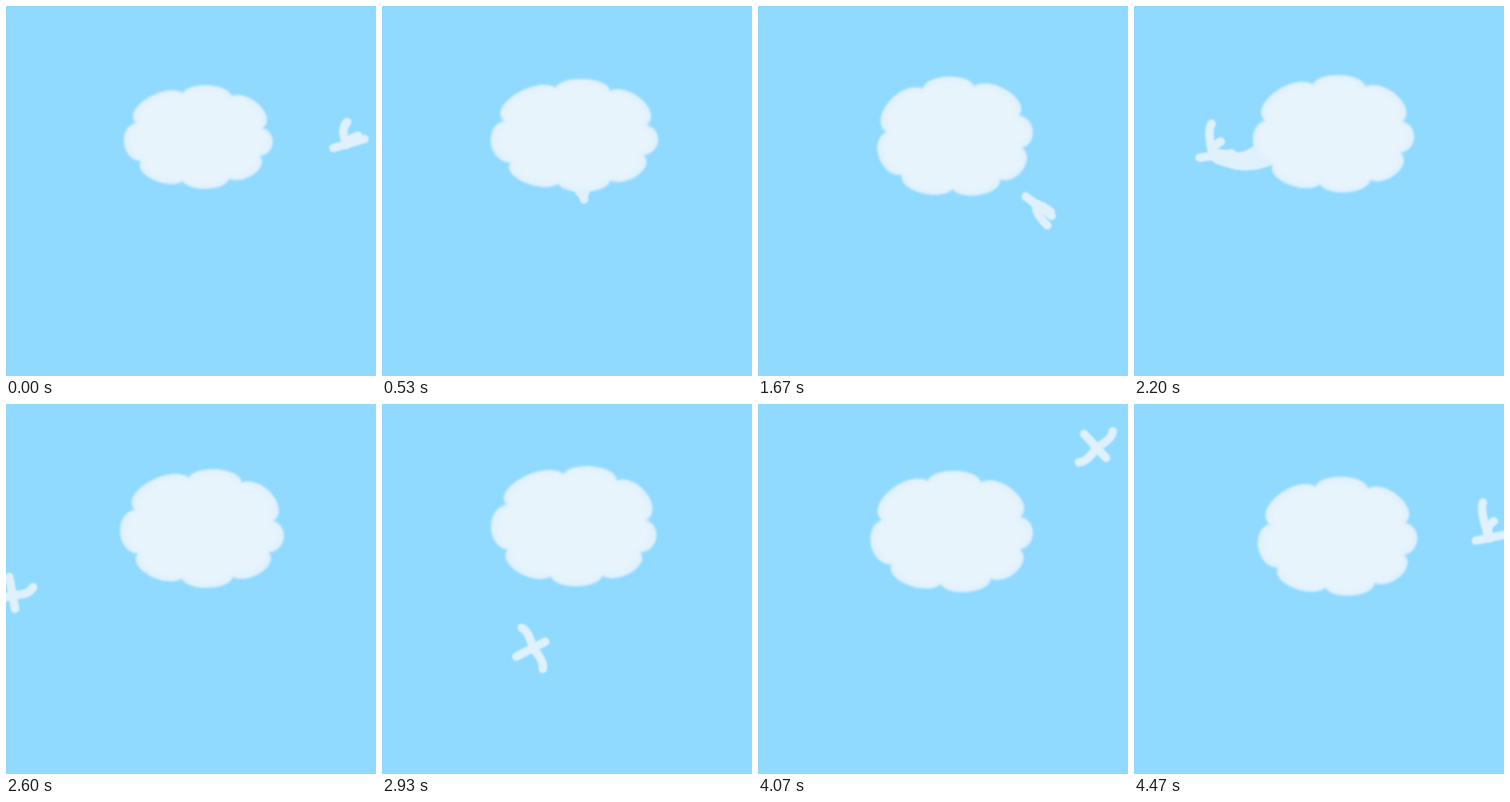
Recreate the animation shown at these times as an HTML page with a canvas. Size 480 px wide and 480 px high, loop 4540 ms.

```html
<!DOCTYPE html>
<html lang="en">
<head>
<meta charset="utf-8">
<title>Cloud and bird</title>
<style>
  html, body { margin: 0; width: 100%; height: 100%; overflow: hidden; background: #90daff; }
  canvas { display: block; width: 100vw; height: 100vh; }
</style>
</head>
<body>
<canvas id="stage" width="480" height="480"></canvas>
<script>
const ctx = document.getElementById('stage').getContext('2d');
const LOOP = 4540, FPS = 15, FRAMES = 68, RAD = Math.PI / 180;
const SKY = '#90daff', EDGE = '#dff1fd', CORE = '#e8f4fc';

// Angles of the notches between the cloud's puffs, clockwise from the right.
const NOTCHES = [21, 60, 101, 146, 195, 253, 296, 346];
const NOTCH_RADIUS = 0.87;

// Key poses of the cloud: frame, centre x, centre y, half width, half height, turn.
const cloudKeys = [
  [0, 250, 170, 95, 66, 3], [8, 250, 168, 107, 72, 2], [18, 250, 172, 100, 78, -14],
  [33, 259, 166, 103, 75, 0], [44, 250, 158, 106, 77, 8], [54, 240, 160, 106, 79, -2],
  [67, 264, 172, 102, 76, -1]
];

// Turning points of the flight: frame, x, y.
const flightKeys = [
  [6, 255, 190], [8, 260, 240], [12, 282, 312], [15, 318, 364], [18, 361, 359], [21, 410, 316],
  [24, 386, 276], [30, 225, 180], [33, 106, 194], [36, 42, 202], [39, 8, 245], [41, 60, 318],
  [44, 193, 318], [48, 262, 210], [51, 275, 125], [54, 341, 87], [57, 366, 52], [60, 418, 36],
  [65, 506, 160], [67, 464, 173], [70, 405, 185], [74, 300, 172]
];

const clamp01 = v => Math.max(0, Math.min(1, v));

// Smooth curve through unevenly spaced keys.
function sample(keys, n) {
  let i = 0;
  while (i < keys.length - 2 && n >= keys[i + 1][0]) i++;
  const a = keys[i], b = keys[i + 1];
  const before = keys[i - 1] || a, after = keys[i + 2] || b;
  const span = b[0] - a[0], u = clamp01((n - a[0]) / span), u2 = u * u, u3 = u2 * u;
  return a.slice(1).map((p, j) => {
    const q = b[j + 1];
    const m0 = (q - before[j + 1]) / (b[0] - before[0]) * span;
    const m1 = (after[j + 1] - p) / (after[0] - a[0]) * span;
    return (2*u3 - 3*u2 + 1) * p + (u3 - 2*u2 + u) * m0 + (3*u2 - 2*u3) * q + (u3 - u2) * m1;
  });
}

function cloudPath([cx, cy, rx, ry, turn]) {
  // Slightly squared ellipse.
  const at = (deg, radius) => {
    const c = Math.cos(deg * RAD), s = Math.sin(deg * RAD);
    const r = radius / (Math.abs(c) ** 2.4 + Math.abs(s) ** 2.4) ** (1 / 2.4);
    return [cx + rx * r * c, cy + ry * r * s];
  };
  const path = new Path2D();
  path.moveTo(...at(NOTCHES[0] + turn, NOTCH_RADIUS));
  NOTCHES.forEach((notch, i) => {
    const from = notch + turn;
    const width = ((NOTCHES[(i + 1) % NOTCHES.length] - notch) + 360) % 360;
    // Control radius that brings the top of the puff to radius 1.
    const reach = (1 - 0.25 * NOTCH_RADIUS * Math.cos(width / 2 * RAD)) /
                  (0.75 * Math.cos(width * 0.35 * RAD));
    path.bezierCurveTo(...at(from + width * 0.15, reach), ...at(from + width * 0.85, reach),
                       ...at(from + width, NOTCH_RADIUS));
  });
  path.closePath();
  return path;
}

function drawCloud(pose) {
  const [cx, cy, rx, ry, turn] = pose;
  ctx.save();
  ctx.filter = 'blur(1.4px)';
  ctx.fillStyle = EDGE;
  ctx.fill(cloudPath(pose));
  ctx.filter = 'blur(4px)';
  ctx.fillStyle = CORE;
  ctx.fill(cloudPath([cx, cy, rx * 0.93, ry * 0.93, turn]));
  ctx.restore();
}

function strokeCurve(width, x0, y0, cx, cy, x1, y1) {
  ctx.lineWidth = width;
  ctx.beginPath();
  ctx.moveTo(x0, y0);
  ctx.quadraticCurveTo(cx, cy, x1, y1);
  ctx.stroke();
}

// Strand of cloud that tapers towards the departing bird.
function drawNeck(x0, y0, x1, y1, sag) {
  ctx.beginPath();
  for (let u = 0; u <= 1; u += 0.05) {
    const x = x0 + (x1 - x0) * u;
    const y = y0 + (y1 - y0) * u + sag * Math.sin(Math.PI * u);
    const radius = 10 + 12 * (1 - u) ** 2;
    ctx.moveTo(x + radius, y);
    ctx.arc(x, y, radius, 0, 2 * Math.PI);
  }
  ctx.fill();
}

function drawBird(frame, [cx, cy, rx, ry]) {
  const n = frame < flightKeys[0][0] ? frame + FRAMES : frame;
  const [x, y] = sample(flightKeys, n);
  const [xa, ya] = sample(flightKeys, n - 0.3), [xb, yb] = sample(flightKeys, n + 0.3);
  const heading = Math.atan2(yb - ya, xb - xa);
  const distance = (px, py) => Math.hypot((px - cx) / rx, (py - cy) / ry);
  const away = distance(x, y), leaving = distance(xb, yb) > distance(xa, ya);

  const open = clamp01((away - 1) * 4);
  const flap = Math.cos(2 * Math.PI * (n - 67) / 5.75);
  // Flying left, the bird is seen from the side with both wings upwards.
  const lean = Math.max(0, -Math.cos(heading));

  ctx.save();
  ctx.filter = 'blur(1.2px)';
  ctx.strokeStyle = ctx.fillStyle = EDGE;
  ctx.lineCap = 'round';
  if (leaving && away > 0.7 && away < 1.6) {
    const k = 0.7 / away;
    drawNeck(cx + (x - cx) * k, cy + (y - cy) * k, x, y, 14 * lean);
  }
  ctx.translate(x, y);
  ctx.rotate(heading);
  const length = 11 + 10 * open;
  strokeCurve(11, -length, 0, 0, 0, length, 0);
  for (const dir of [-1, 1]) {
    const forward = open * (-12 + 14 * flap - 9 * lean * (1 - dir) / 2);
    const side = open * (dir * (24 + 6 * flap - 17 * lean) + lean * (4 + 30 * flap));
    strokeCurve(11, 3, 0, 8 + forward * 0.3, side * 0.75, forward, side);
  }
  ctx.restore();
}

function render(now) {
  const frame = Math.min(FRAMES - 1, Math.floor((now % LOOP + 3.4) * FPS / 1000));
  const pose = sample(cloudKeys, frame);
  ctx.fillStyle = SKY;
  ctx.fillRect(0, 0, 480, 480);
  drawBird(frame, pose);
  drawCloud(pose);
}

const start = performance.now();
function tick() {
  render(performance.now() - start);
  requestAnimationFrame(tick);
}
tick();
</script>
</body>
</html>
```
